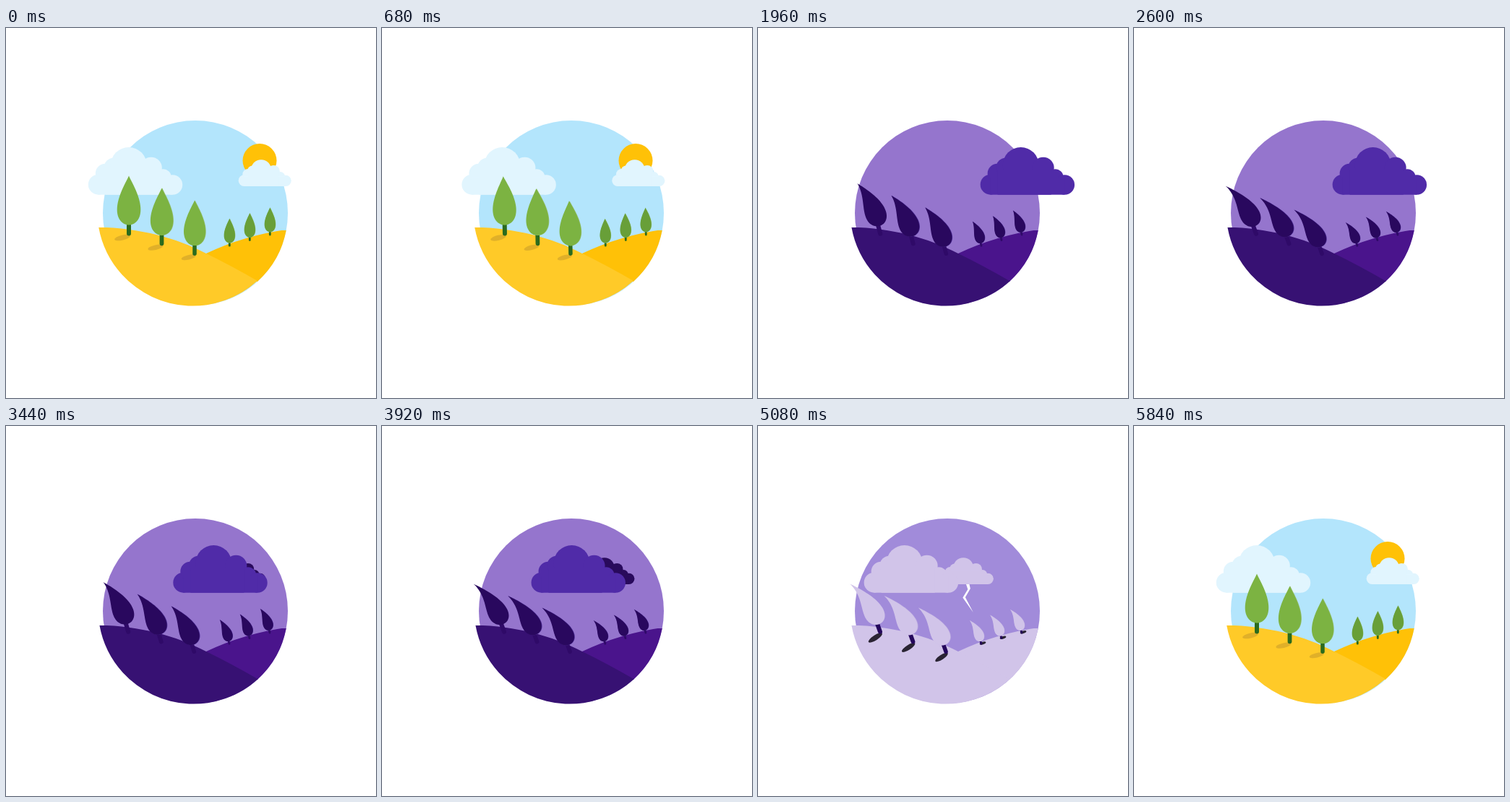
Recreate the animation shown at these times as an HTML page with a canvas. Size 512 by 512 pixels, loop 5880 ms.

```html
<!DOCTYPE html>
<html lang="en">
<head>
<meta charset="utf-8">
<title>Hills in changing weather</title>
<style>
  html, body { margin: 0; width: 100%; height: 100%; overflow: hidden; background: #fff; }
  canvas { display: block; width: 512px; height: 512px; }
</style>
</head>
<body>
<canvas id="stage" width="512" height="512"></canvas>
<script>
const ctx = document.getElementById('stage').getContext('2d');
const TAU = Math.PI * 2;
const LOOP = 5880, STEP = 40;
const STORM_START = 1880, STORM_END = 5840;
const FLASH_STARTS = [3960, 5040], FLASH_TIME = 120;

const DAY = {
  sky: '#b3e5fc', cloud: '#e1f5fe', smallCloud: '#e1f5fe', sun: '#ffc107',
  near: '#ffca28', far: '#ffc107', tree: '#7cb342', farTree: '#689f38',
  edge: '#94bd6c', trunk: '#2b6b1d', shadow: '#e0b029'
};
const STORM = {
  sky: '#9575cd', cloud: '#502ba8', smallCloud: '#290a5c',
  near: '#371173', far: '#4a148c', tree: '#29085e', farTree: '#29085e',
  edge: '#4b2c92', trunk: '#2f0a68'
};
const PALE = '#d1c4e9', INK = '#2a2433';
const FLASH = {
  sky: '#a18bda', cloud: PALE, smallCloud: PALE, near: PALE, far: PALE,
  tree: PALE, farTree: PALE, edge: '#bba9e0', trunk: '#25075c',
  shadow: INK, farShadow: INK, bolt: '#fff'
};

function disc(x, y, r, color) {
  ctx.fillStyle = color;
  ctx.beginPath();
  ctx.arc(x, y, r, 0, TAU);
  ctx.fill();
}

function ellipse(x, y, rx, ry, angle, color) {
  ctx.fillStyle = color;
  ctx.beginPath();
  ctx.ellipse(x, y, rx, ry, angle, 0, TAU);
  ctx.fill();
}

// x, y is the lower left corner
function cloud(x, y, scale, color) {
  ctx.save();
  ctx.translate(x, y);
  ctx.scale(scale, scale);
  disc(14, -14, 14, color);
  disc(23.5, -29.5, 13.5, color);
  disc(35, -38, 13, color);
  disc(56, -40.7, 25, color);
  disc(87, -37, 15, color);
  disc(103.5, -24, 11.5, color);
  disc(116.7, -13.7, 13.7, color);
  ctx.fillRect(14, -24, 102.5, 24);
  ctx.fillRect(24, -34, 74, 34);
  ctx.restore();
}

function hills(c, left) {
  ctx.fillStyle = c.far;
  ctx.beginPath();
  ctx.moveTo(277, 312);
  ctx.quadraticCurveTo(330, 287, 388, 279);
  ctx.arc(262, 256, 128, Math.atan2(23, 126), Math.atan2(95, 86));
  ctx.lineTo(277, 330);
  ctx.fill();

  ctx.fillStyle = c.near;
  ctx.beginPath();
  ctx.moveTo(left, 275.5);
  ctx.bezierCurveTo(185, 277, 235, 290, 277, 312);
  ctx.quadraticCurveTo(310, 328, 349, 350.5);
  ctx.arc(left + 130.5, 252.2, 132.4, Math.atan2(98, 89), Math.PI - Math.atan2(23.3, 130.5));
  ctx.fill();
}

// A teardrop whose spine bows to the left, most of all at the tip.
function canopy(lean, foot, dx, color) {
  const top = 83;
  ctx.fillStyle = color;
  ctx.beginPath();
  for (let a = 0; a < TAU; a += TAU / 90) {
    const h = top - (top - foot) * (1 - Math.cos(a)) / 2;
    const half = 22 * Math.sin(a) * Math.sin(a / 2) ** 1.2 * (1 - 0.1 * lean);
    const bow = lean * (7 + 36.5 * (h / top) ** 3);
    ctx.lineTo(half - bow + dx, -h * (1 - 0.17 * lean));
  }
  ctx.fill();
}

function tree(x, y, scale, lean, c, far) {
  ctx.save();
  ctx.translate(x, y);
  ctx.scale(scale, scale);

  ctx.save();
  ctx.rotate(-0.35 * lean);
  if (far && c.farShadow) ellipse(4.8, -3.4, 9.5, 3.8, 0, c.farShadow);
  if (!far && c.shadow) ellipse(-9, 2.6, 11.2, 3.5, -0.23, c.shadow);
  ctx.strokeStyle = c.trunk;
  ctx.lineWidth = 6;
  ctx.lineCap = 'round';
  ctx.beginPath();
  ctx.moveTo(0, -24);
  ctx.lineTo(0, -3);
  ctx.stroke();
  ctx.restore();

  const foot = far ? 11 : 15;
  if (scale < 1) canopy(lean, foot, 0.8, c.edge);
  canopy(lean, foot, 0, far ? c.farTree : c.tree);
  ctx.restore();
}

function bolt(x, y, color) {
  ctx.save();
  ctx.translate(x, y);
  ctx.fillStyle = color;
  ctx.beginPath();
  ctx.moveTo(-1.5, -0.5);
  ctx.lineTo(3, -0.5);
  ctx.lineTo(4.5, 6);
  ctx.lineTo(-2.5, 18);
  ctx.lineTo(8.5, 39);
  ctx.lineTo(-6, 18.5);
  ctx.lineTo(1, 7);
  ctx.fill();
  ctx.restore();
}

function wave(t, period) {
  return (1 - Math.cos(t / period * TAU)) / 2;
}

function draw(time) {
  const storm = time >= STORM_START && time < STORM_END;
  const t = storm ? time - STORM_START : time >= STORM_END ? 0 : time;
  const flash = FLASH_STARTS.some(s => time >= s && time < s + FLASH_TIME);
  const c = flash ? FLASH : storm ? STORM : DAY;
  const lean = storm ? 0.74 + 0.26 * wave(t, 1320) : 0.09 * wave(t, 940);
  const bigX = storm ? 311.8 - 0.0516 * t : 113.8 - 0.005 * t;
  const smallX = storm ? 317.8 - 0.0203 * t : 321.7 - 0.005 * t;

  ctx.fillStyle = '#fff';
  ctx.fillRect(0, 0, 512, 512);
  disc(262, 256, 128, c.sky);
  if (c.sun) disc(351, 183.5, 23.5, c.sun);
  if (c.bolt) bolt(smallX + 36.5, 219, c.bolt);
  cloud(smallX, 219, 0.56, c.smallCloud);
  cloud(bigX, 230.7, 1, c.cloud);
  hills(c, storm ? 129.2 : 128);
  for (let i = 0; i < 3; i++) {
    tree(309.3 + 28 * i, 302.6 - 7.6 * i, 0.47, lean * 0.82, c, true);
    tree(170 + 45.5 * i, 287.5 + 13.7 * i, 1 - 0.04 * i, lean, c, false);
  }
}

const start = performance.now();
function tick() {
  const t = (performance.now() - start) % LOOP;
  draw(Math.floor(t / STEP) * STEP);
  requestAnimationFrame(tick);
}
tick();
</script>
</body>
</html>
```
